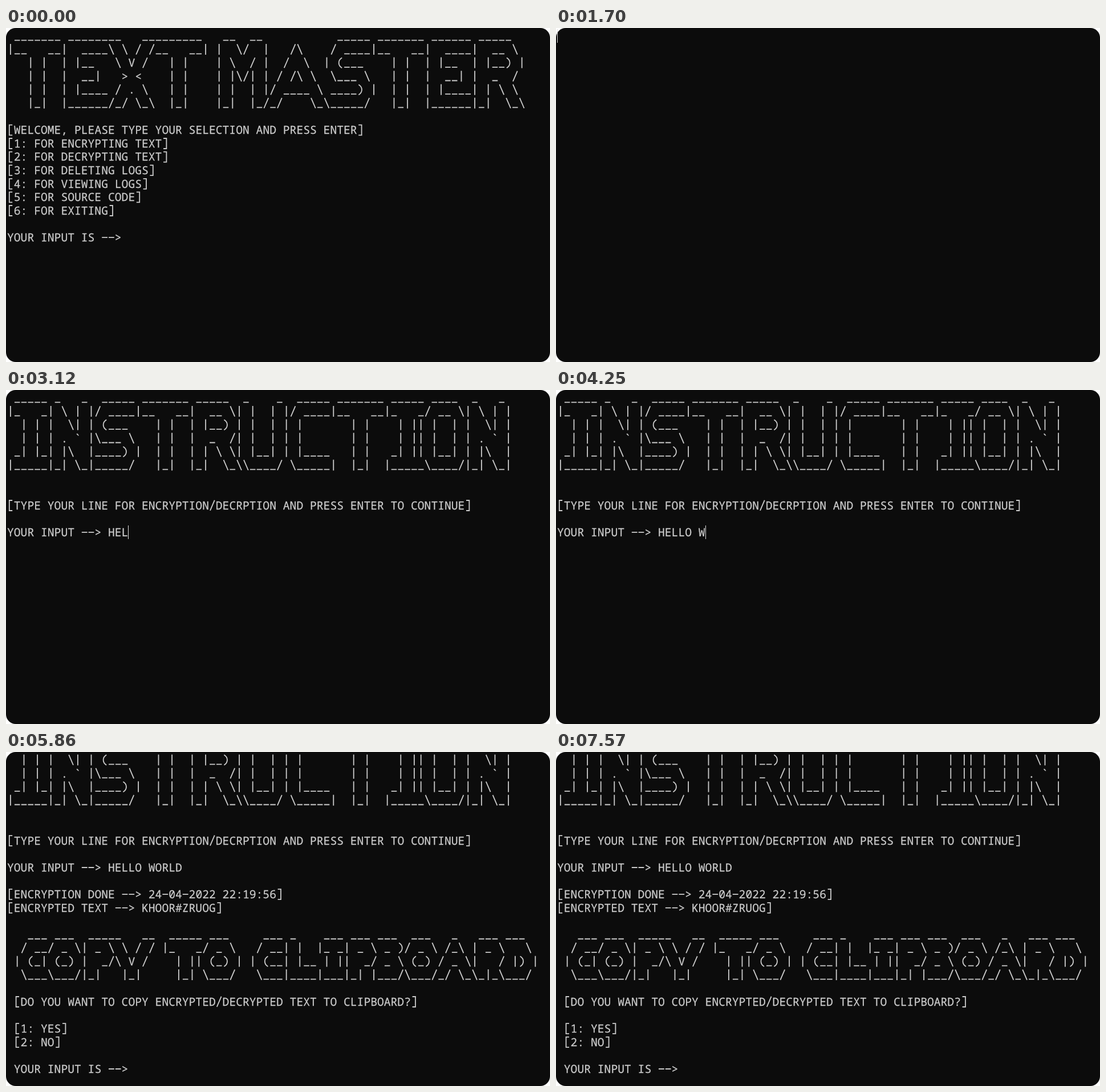
Write an HTML page that moves like this. It is 954 px wide and 587 px high and loops after 8000 ms.

```html
<!DOCTYPE html>
<html lang="en">
<head>
<meta charset="utf-8">
<title>Text Master terminal</title>
<style>
  html, body { margin: 0; width: 100%; height: 100%; overflow: hidden; background: #fff; }
  svg { display: block; width: 954px; height: 587px; }
  text {
    font: 19.667px "Noto Sans Mono", "DejaVu Sans Mono", monospace;
    fill: #ccc; stroke: #ccc; stroke-width: .25;
    white-space: pre; text-rendering: geometricPrecision;
  }
  path { fill: none; stroke: #ccc; stroke-width: 1.8; }
</style>
</head>
<body>
<svg id="stage" viewBox="0 0 954 587">
  <rect width="954" height="587" rx="17" fill="#0c0c0c"/>
</svg>

<script type="text/plain" id="menu">
 _______ ________   _________   __  __           _____ _______ ______ _____
|__   __|  ____\ \ / /__   __| |  \/  |   /\    / ____|__   __|  ____|  __ \
   | |  | |__   \ V /   | |    | \  / |  /  \  | (___    | |  | |__  | |__) |
   | |  |  __|   > <    | |    | |\/| | / /\ \  \___ \   | |  |  __| |  _  /
   | |  | |____ / . \   | |    | |  | |/ ____ \ ____) |  | |  | |____| | \ \
   |_|  |______/_/ \_\  |_|    |_|  |_/_/    \_\_____/   |_|  |______|_|  \_\

[WELCOME, PLEASE TYPE YOUR SELECTION AND PRESS ENTER]
[1: FOR ENCRYPTING TEXT]
[2: FOR DECRYPTING TEXT]
[3: FOR DELETING LOGS]
[4: FOR VIEWING LOGS]
[5: FOR SOURCE CODE]
[6: FOR EXITING]

YOUR INPUT IS -->
</script>
<script type="text/plain" id="entry">
 _____ _   _  _____ _______ _____  _    _  _____ _______ _____ ____  _   _
|_   _| \ | |/ ____|__   __|  __ \| |  | |/ ____|__   __|_   _/ __ \| \ | |
  | | |  \| | (___    | |  | |__) | |  | | |       | |    | || |  | |  \| |
  | | | . ` |\___ \   | |  |  _  /| |  | | |       | |    | || |  | | . ` |
 _| |_| |\  |____) |  | |  | | \ \| |__| | |____   | |   _| || |__| | |\  |
|_____|_| \_|_____/   |_|  |_|  \_\\____/ \_____|  |_|  |_____\____/|_| \_|


[TYPE YOUR LINE FOR ENCRYPTION/DECRPTION AND PRESS ENTER TO CONTINUE]

YOUR INPUT -->
</script>
<script type="text/plain" id="reply">
 HELLO WORLD

[ENCRYPTION DONE --> 24-04-2022 22:19:56]
[ENCRYPTED TEXT --> KHOOR#ZRUOG]

   ___ ___  _____   __  _____ ___     ___ _    ___ ___ ___  ___   _   ___ ___
  / __/ _ \| _ \ \ / / |_   _/ _ \   / __| |  |_ _| _ \ _ )/ _ \ /_\ | _ \   \
 | (_| (_) |  _/\ V /    | || (_) | | (__| |__ | ||  _/ _ \ (_) / _ \|   / |) |
  \___\___/|_|   |_|     |_| \___/   \___|____|___|_| |___/\___/_/ \_\_|_\___/

 [DO YOU WANT TO COPY ENCRYPTED/DECRYPTED TEXT TO CLIPBOARD?]

 [1: YES]
 [2: NO]

 YOUR INPUT IS -->
</script>

<script>
const LOOP = 8000, CELL = 11.8, LINE = 23.6, PAD = 2, BASE = 18.9;
const stage = document.getElementById('stage');
const colX = c => PAD + c * CELL;
const rowY = r => PAD + r * LINE;

function add(parent, tag, attrs) {
  const el = document.createElementNS('http://www.w3.org/2000/svg', tag);
  for (const k in attrs) el.setAttribute(k, attrs[k]);
  return parent.appendChild(el);
}

// Line-drawing characters as strokes, relative to the cell's top left.
const STROKES = {
  '|': 'm5.9 2.4v19',
  '_': 'm1.1 19.7h9.6',
  '-': 'm1 12.2h9.8',
  '/': 'm2 21l7.8-18.2',
  '\\': 'm2 2.8l7.8 18.2',
  '[': 'm9.2 3.2h-5.4v18h5.4',
  ']': 'm2.6 3.2h5.4v18h-5.4',
  '(': 'm9 3c-7.4 4.5-7.4 13.5 0 18',
  ')': 'm2.8 3c7.4 4.5 7.4 13.5 0 18'
};

function drawScreen(lines) {
  const group = add(stage, 'g', { visibility: 'hidden' });
  let d = '';
  lines.forEach((line, r) => {
    const y = rowY(r);
    [...line].forEach((ch, c) => {
      if (STROKES[ch]) d += `M${colX(c)} ${y}${STROKES[ch]}`;
    });
    for (const word of line.matchAll(/[^\s|_\-\/\\[\]()]+/g))
      add(group, 'text', { x: colX(word.index), y: y + BASE }).textContent = word[0];
  });
  add(group, 'path', { d });
  return group;
}

const read = id => document.getElementById(id).textContent.slice(1).trimEnd();
const screens = {
  menu: drawScreen(read('menu').split('\n')),
  entry: drawScreen(read('entry').split('\n')),
  result: drawScreen((read('entry') + read('reply')).split('\n').slice(2))
};
const prompts = { menu: [18, 15], entry: [15, 10], result: [19, 23], blank: [0, 0] };

const typed = add(stage, 'text', {});
const cursor = add(stage, 'rect', { width: 1 });

const PHRASE = 'HELLO WORLD';
const KEYS = [2660, 2890, 3120, 3320, 3500, 3760, 4250, 4500, 4730, 4890, 5100];

// Cursor opacity from each moment on.
const BLINK = [
  [0, 0], [130, 1], [900, 0], [1460, 1], [1735, 0], [1770, 1], [2310, .5],
  [2350, 0], [2660, 1], [5860, 0], [5890, 1], [6500, 0], [7040, 1], [7570, 0]
];

function screenAt(t) {
  if (t < 1700) return 'menu';
  if (t < 1735) return 'blank';
  return t < 5860 ? 'entry' : 'result';
}

function inputAt(name, t) {
  if (name === 'menu') return t >= 290 ? '1' : '';
  if (name === 'entry') return PHRASE.slice(0, KEYS.filter(k => k <= t).length);
  return '';
}

function render(t) {
  const name = screenAt(t), input = inputAt(name, t);
  const [col, row] = prompts[name];
  for (const key in screens)
    screens[key].setAttribute('visibility', key === name ? 'visible' : 'hidden');

  typed.textContent = input;
  typed.setAttribute('x', colX(col));
  typed.setAttribute('y', rowY(row) + BASE);

  const top = Math.round(rowY(row));
  cursor.setAttribute('x', Math.round(colX(col + input.length)));
  cursor.setAttribute('y', top);
  cursor.setAttribute('height', Math.round(rowY(row + 1)) - top);
  cursor.setAttribute('fill', name === 'result' ? '#a5d8d8' : '#dcdcdc');
  cursor.setAttribute('opacity', BLINK.filter(b => b[0] <= t).pop()[1]);
}

const start = performance.now();
function tick() {
  render((performance.now() - start) % LOOP);
  requestAnimationFrame(tick);
}
tick();
</script>
</body>
</html>
```
